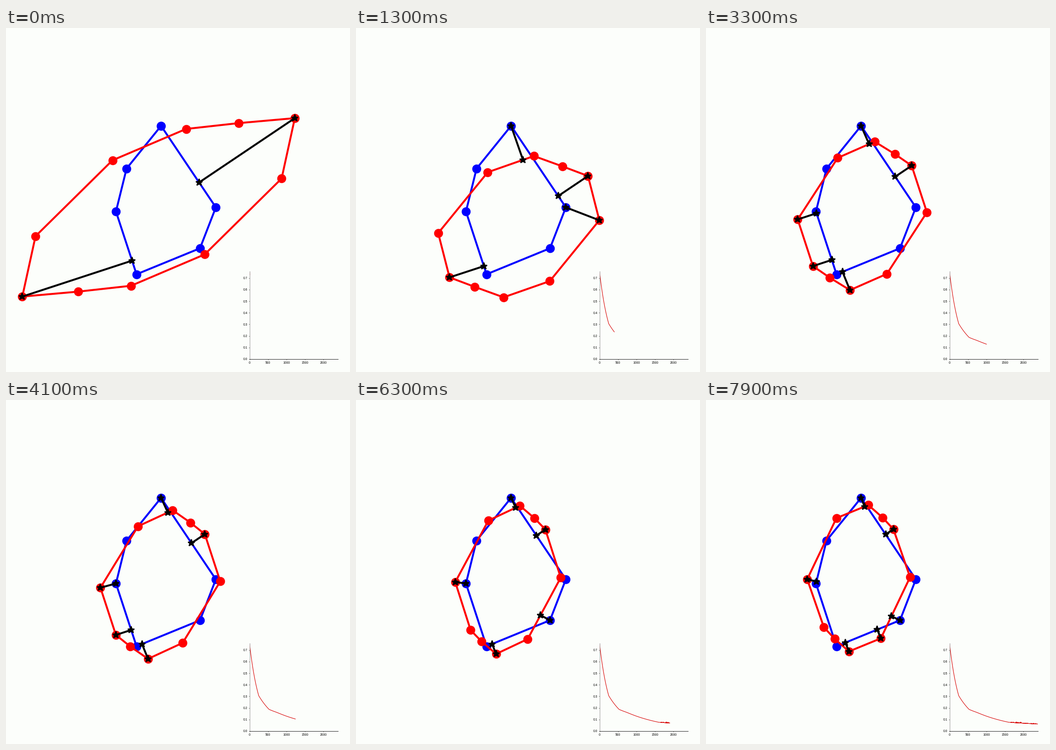
Write a matplotlib script that moves like this. It is 748x748 px and loops after 8 s.

```python
import numpy as np
import matplotlib.pyplot as plt
from matplotlib.animation import FuncAnimation

SIZE, DPI = 748, 100
PX = 72 / DPI                      # one pixel in points
FRAMES, INTERVAL = 80, 100
STEPS_PER_FRAME, FIRST_STEP = 30, 10
LOSS_TO_PX = 335
RATE, MAX_MOVES = .12, 500         # size and number of descent moves per frame
TIE = 1.5                          # distances this close to the maximum count as equal
BG = "#fcfefb"

polygon = np.array([(337.2, 212.8), (456.3, 390), (421.8, 479),
                    (283.8, 535.5), (239.1, 399), (262.2, 305.6)])
base = np.array([35.5, 584])
generators = np.array([(28.7, -131.3), (167.4, -165.1), (160.1, -68.1),
                       (114.5, -12.7), (121.8, -10.8)])

# Each vertex is the base plus a run of the generators sorted by angle.
below = np.tri(5, k=-1)
MEMBERS = np.hstack([np.ones((10, 1)), np.vstack([1 - below, below])])


def smooth_loss(step):
    knots = [0, 249, 530, 760, 1600, 2400]
    values = [.755, .3056, .187, .159, .0765, .0613]
    return np.exp(np.interp(step, knots, np.log(values)))


def noisy_loss(steps):
    rng = np.random.default_rng(4)
    jitter = rng.uniform(-.0006, .0006, len(steps))
    spikes = (rng.random(len(steps)) < .015) * rng.uniform(.003, .009, len(steps))
    return smooth_loss(steps) + (steps > 1650) * (jitter + spikes)


def project(points, shape):
    """Nearest edge, place along it, offset and distance to a filled convex shape."""
    edges = np.roll(shape, -1, axis=0) - shape
    rel = points[:, None] - shape
    along = np.clip((rel * edges).sum(2) / (edges ** 2).sum(1), 0, 1)
    offsets = rel - along[..., None] * edges
    dist = np.hypot(offsets[..., 0], offsets[..., 1])
    inside = (edges[:, 0] * rel[..., 1] >= edges[:, 1] * rel[..., 0]).all(1)
    rows, edge = np.arange(len(points)), dist.argmin(1)
    return edge, along[rows, edge], offsets[rows, edge], np.where(inside, 0, dist[rows, edge])


def descend(params, target):
    """Shrink the largest gap between the shapes, one worst point at a time."""
    for _ in range(MAX_MOVES):
        shape = MEMBERS @ params
        _, _, out_offsets, out_dist = project(shape, polygon)
        edge, along, in_offsets, in_dist = project(polygon, shape)
        if max(out_dist.max(), in_dist.max()) <= target:
            break
        if out_dist.max() >= in_dist.max():
            k = out_dist.argmax()
            weights, pull = MEMBERS[k], out_offsets[k] / out_dist[k]
        else:
            k = in_dist.argmax()
            start, end = MEMBERS[edge[k]], MEMBERS[(edge[k] + 1) % len(MEMBERS)]
            weights = start + along[k] * (end - start)
            pull = -in_offsets[k] / in_dist[k]
        params = params - RATE * np.outer(weights, pull)
        order = np.argsort(np.arctan2(params[1:, 1], params[1:, 0]))
        params[1:] = params[1:][order]
    return params


def widest_gaps(shape):
    points = np.vstack([shape, polygon])
    _, _, out_offsets, out_dist = project(shape, polygon)
    _, _, in_offsets, in_dist = project(polygon, shape)
    feet = points - np.vstack([out_offsets, in_offsets])
    dist = np.concatenate([out_dist, in_dist])
    tied = dist >= dist.max() - TIE
    breaks = np.full_like(points, np.nan)
    return np.stack([points, feet, breaks], axis=1)[tied].reshape(-1, 2)


def closed(points):
    return np.vstack([points, points[:1]]).T


def step_at(frame):
    return FIRST_STEP + STEPS_PER_FRAME * frame


poses = [np.vstack([base, generators])]
for frame in range(1, FRAMES):
    poses.append(descend(poses[-1], LOSS_TO_PX * smooth_loss(step_at(frame))))
shapes = [MEMBERS @ params for params in poses]

fig = plt.figure(figsize=(SIZE / DPI, SIZE / DPI), dpi=DPI, facecolor=BG)
ax = fig.add_axes([0, 0, 1, 1])
ax.set(xlim=(0, SIZE), ylim=(SIZE, 0))
ax.axis("off")

outline = dict(marker="o", lw=4.2 * PX, ms=18.5 * PX, mew=1 * PX)
ax.plot(*closed(polygon), color="blue", zorder=2, **outline)
red_line, = ax.plot([], [], color="red", zorder=3, **outline)
gap_line, = ax.plot([], [], color="black", marker="*", lw=4.2 * PX,
                    ms=15.5 * PX, mew=2.4 * PX, zorder=4)

left, right, top, bottom = 529.5, 722.5, 529, 720
chart = fig.add_axes([left / SIZE, 1 - bottom / SIZE,
                      (right - left) / SIZE, (bottom - top) / SIZE], facecolor="none")
chart.set(xlim=(0, 2400), ylim=(0, .758),
          xticks=range(0, 2001, 500), yticks=np.arange(8) / 10)
chart.spines[["top", "right"]].set_visible(False)
chart.spines["left"].set(linewidth=.8 * PX, color="0.5")
chart.spines["bottom"].set(linewidth=1 * PX, color="0.15")
chart.tick_params(length=2.5 * PX, width=.8 * PX, pad=1.5 * PX, labelsize=6.8 * PX,
                  labelfontfamily="Liberation Sans", color="0.3")
chart.tick_params(axis="x", pad=3 * PX)
loss_line, = chart.plot([], [], color="#d80000", lw=1.1 * PX)

all_steps = np.arange(2401)
all_losses = noisy_loss(all_steps)


def update(frame):
    shown = step_at(frame) + 1
    red_line.set_data(*closed(shapes[frame]))
    gap_line.set_data(*widest_gaps(shapes[frame]).T)
    loss_line.set_data(all_steps[:shown], all_losses[:shown])
    return red_line, gap_line, loss_line


anim = FuncAnimation(fig, update, frames=FRAMES, interval=INTERVAL, repeat=True)
plt.show()
```
